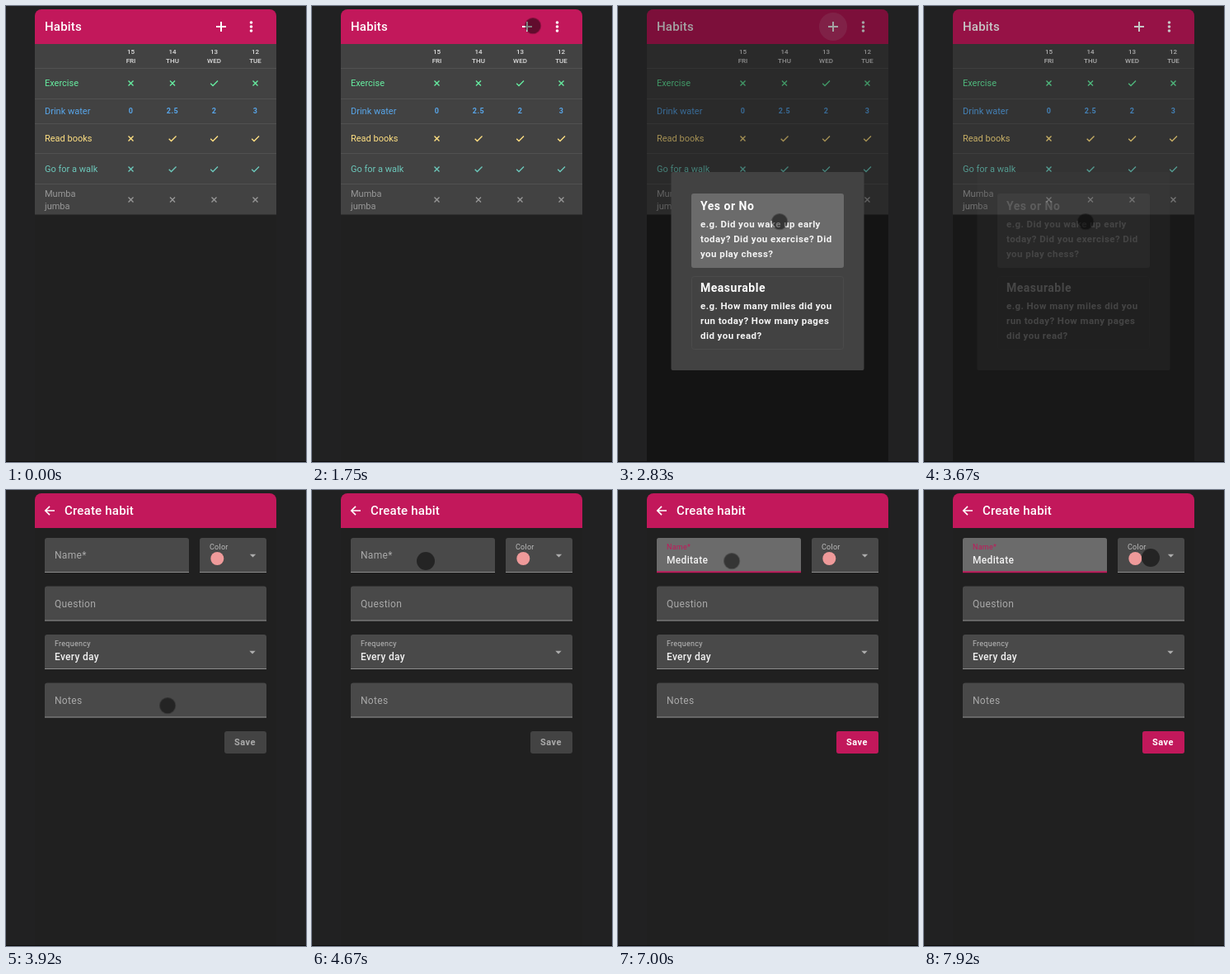
Write an HTML page that moves like this. It is 364 by 552 pixels and loops after 8 s.

```html
<!DOCTYPE html>
<html lang="en">
<head>
<meta charset="utf-8">
<title>Habits</title>
<style>
html, body { margin: 0; width: 364px; height: 552px; overflow: hidden; background: #212122; }
svg { display: block; font: 12px Roboto, sans-serif; letter-spacing: .3px; }

.bar { fill: #c2185b; }
.title { font-size: 15px; font-weight: 500; letter-spacing: .2px; fill: #fff; }
.day { font-size: 8px; font-weight: 500; letter-spacing: 0; text-anchor: middle; fill: #dedede; }
.habit { font-size: 11px; letter-spacing: 0; fill: currentColor; }
.count { font-size: 9px; font-weight: 700; letter-spacing: .5px; text-anchor: middle; fill: currentColor; }
.mark { fill: none; stroke: currentColor; stroke-width: 1.4; }
.rule { stroke: #515151; }
.kind { font-size: 14px; font-weight: 700; letter-spacing: .5px; fill: #fff; }
.hint { font-size: 11.5px; font-weight: 700; letter-spacing: .43px; fill: #f4f4f4; }
.field { fill: #494949; }
.line { stroke: #8c8c8c; }
.empty { fill: #a9a9a9; }
.label { font-size: 9px; letter-spacing: .25px; fill: #bdbdbd; }
.value { font-weight: 500; fill: #f2f2f2; }
.save { font-size: 11px; font-weight: 700; letter-spacing: .5px; }

/* One loop is 96 ticks of 83.33 ms */
.list, .form, .scrim, .dialog, .ripple, .caret, .blink, .touch, .press {
  animation: 8s linear -6ms infinite;
}
.list { animation-name: list; }
.form { animation-name: form; }
.scrim { animation-name: scrim; }
.dialog { animation-name: dialog; transform-origin: 181.5px 321px; }
.ripple { animation-name: ripple; }
.caret { animation-name: caret; animation-timing-function: step-end; }
.blink { animation-name: blink; animation-timing-function: step-end; }
.touch { animation-name: touch; }
.press { animation-name: press; animation-timing-function: step-end; }

/* Appears at tick --f and stays until its screen is gone */
.on { animation: on 8s step-end calc(var(--f) * 83.333ms - 8006ms) infinite; }

@keyframes on { 0% { visibility: visible } 50%, 100% { visibility: hidden } }
@keyframes list {
  0% { opacity: 1; animation-timing-function: step-end }
  46.875%, 100% { opacity: 0 }
}
@keyframes form {
  0% { opacity: 0; animation-timing-function: step-end }
  46.875%, 100% { opacity: 1 }
}
@keyframes scrim {
  0%, 24.5% { opacity: 0 }
  26.5% { opacity: 1 }
  44.7917% { opacity: .85; animation-timing-function: step-end }
  45.8333%, 100% { opacity: .62 }
  44.78% { opacity: 1 }
}
@keyframes dialog {
  0%, 24.5% { opacity: 0; transform: scale(.8) }
  25.6% { opacity: 1 }
  26.5%, 44.78% { opacity: 1; transform: none }
  44.7917% { opacity: .55; animation-timing-function: step-end }
  45.8333%, 100% { opacity: .2; transform: none }
}
@keyframes ripple {
  0%, 24% { opacity: 0 }
  26%, 44.78% { opacity: 1 }
  44.7917%, 100% { opacity: 0 }
}
@keyframes caret {
  0% { transform: translateX(59px) }
  67.7083% { transform: translateX(70px) }
  70.8333% { transform: translateX(76.8px) }
  73.9583% { transform: translateX(87px) }
  76.0417% { transform: translateX(91.3px) }
  77.0833% { transform: translateX(98px) }
  79.1667% { transform: translateX(102.4px) }
  80.2083%, 100% { transform: translateX(109px) }
}
@keyframes blink {
  0%, 59.375% { opacity: 1 }
  64.5833% { opacity: 0 }
  67.7083% { opacity: 1 }
  87.5% { opacity: 0 }
  92.7083% { opacity: 1 }
  98.9583%, 100% { opacity: 0 }
}
@keyframes touch {
  0% { transform: translate(60px, 564px) }
  5.2083% { transform: translate(60px, 564px); animation-timing-function: steps(10, start) }
  15.625% { transform: translate(220px, 190px); animation-timing-function: steps(5, start) }
  20.8333% { transform: translate(268px, 24px) }
  25% { transform: translate(268px, 24px); animation-timing-function: steps(10, start) }
  35.4167% { transform: translate(196px, 261px) }
  50% { transform: translate(196px, 261px); animation-timing-function: steps(9, start) }
  59.375% { transform: translate(138px, 86px) }
  91.6667% { transform: translate(138px, 86px); animation-timing-function: steps(4, start) }
  95.8333% { transform: translate(207px, 64px); animation-timing-function: steps(4, start) }
  100% { transform: translate(275px, 82px) }
}
@keyframes press {
  0%, 25%, 50%, 91.6667%, 100% { transform: none }
  21.875%, 35.4167%, 59.375% { transform: scale(.88) }
}
</style>
</head>
<body>
<svg width="364" height="552" viewBox="0 0 364 552">
  <defs>
    <path id="no" class="mark" d="M-3-3 3 3M3-3-3 3"/>
    <path id="yes" class="mark" d="M-4.3.3-1.5 3 4.5-3"/>
    <path id="top" d="M35 46V12a8 8 0 0 1 8-8H320a8 8 0 0 1 8 8V46z"/>
    <path id="drop" d="M-3.7-1.8H3.7L0 1.9z" fill="#adadad"/>
  </defs>
  <rect x="35" y="46" width="293" height="506" fill="#202020"/>

  <g class="list">
    <use href="#top" class="bar"/>
    <text class="title" x="47" y="30">Habits</text>
    <circle class="ripple" cx="261" cy="25" r="17" fill="#fff" fill-opacity=".13"/>
    <path d="M255 25h12M261 19v12" stroke="#fff" stroke-width="2"/>
    <g fill="#fff">
      <circle cx="297.5" cy="20" r="1.8"/><circle cx="297.5" cy="25" r="1.8"/><circle cx="297.5" cy="30" r="1.8"/>
    </g>
    <rect x="35" y="46" width="293" height="206.5" fill="#424242"/>
    <g id="table"></g>

    <path class="scrim" d="M35 552V12a8 8 0 0 1 8-8H320a8 8 0 0 1 8 8V552z" fill-opacity=".36"/>
    <g class="dialog">
      <rect x="64.5" y="201" width="234" height="240" rx="2" fill="#424242"/>
      <rect x="89.5" y="327.5" width="184" height="88" rx="3" fill="none" stroke="#4b4b4b"/>
      <rect x="89" y="227" width="185" height="90" rx="3" fill="#484848"/>
      <rect class="on" style="--f:32" x="89" y="227" width="185" height="90" rx="3" fill="#6b6b6b"/>
      <text class="kind" x="100" y="247">Yes or No</text>
      <text class="hint">
        <tspan x="100" y="268">e.g. Did you wake up early</tspan>
        <tspan x="100" y="286">today? Did you exercise? Did</tspan>
        <tspan x="100" y="304">you play chess?</tspan>
      </text>
      <text class="kind" x="100" y="346">Measurable</text>
      <text class="hint">
        <tspan x="100" y="367">e.g. How many miles did you</tspan>
        <tspan x="100" y="385">run today? How many pages</tspan>
        <tspan x="100" y="403">did you read?</tspan>
      </text>
    </g>
  </g>

  <g class="form">
    <use href="#top" class="bar"/>
    <path d="M59 25H48.5M53 19.8 47.8 25 53 30.2" fill="none" stroke="#fff" stroke-width="1.7"/>
    <text class="title" x="71" y="30">Create habit</text>
    <g id="fields"></g>

    <text class="empty" x="59" y="83">Name*</text>
    <text class="label" x="247" y="72">Color</text>
    <circle cx="256.3" cy="83" r="8" fill="#ef9a9a"/>
    <use href="#drop" x="299.5" y="79.5"/>
    <text class="empty" x="59" y="142">Question</text>
    <text class="label" x="59" y="189">Frequency</text>
    <text class="value" x="59" y="206">Every day</text>
    <use href="#drop" x="299" y="196.5"/>
    <text class="empty" x="59" y="259">Notes</text>

    <rect x="265" y="292" width="51" height="27" rx="3" fill="#434343"/>
    <text class="save" x="277" y="309" fill="#ababab">Save</text>
    <g class="on" style="--f:65">
      <rect class="bar" x="265" y="292" width="51" height="27" rx="3"/>
      <text class="save" x="277" y="309" fill="#fff">Save</text>
    </g>

    <g class="on" style="--f:57">
      <path d="M47 100V61a3 3 0 0 1 3-3H219a3 3 0 0 1 3 3V100z" fill="#6b6b6b"/>
      <rect class="bar" x="47" y="98.3" width="175" height="1.9"/>
      <text class="label" x="59" y="72" style="fill:#c2185b">Name*</text>
      <g class="caret"><rect class="bar blink" y="78" width="1" height="14"/></g>
    </g>
    <text class="value" id="typed" x="59" y="89"></text>
  </g>

  <g class="touch"><circle class="press" r="11" fill-opacity=".5"/></g>
  <rect y="551" width="364" height="1" fill="#0b0b0b"/>
</svg>
<script>
const put = (id, html) => document.getElementById(id).innerHTML = html;
const cols = [151.5, 202, 252.5, 302.5];

const days = ['15 FRI', '14 THU', '13 WED', '12 TUE'].map((d, i) => {
  const [num, name] = d.split(' ');
  return `<text class="day" x="${cols[i]}" y="58">${num}</text><text class="day" x="${cols[i]}" y="69">${name}</text>`;
});

// name, middle of the row, colour, one entry per day
const rows = [
  ['Exercise', 93.5, '#66eca0', 'no no yes no'],
  ['Drink water', 127, '#58a6ea', '0 2.5 2 3'],
  ['Read books', 160.5, '#ffe082', 'no yes yes yes'],
  ['Go for a walk', 197.5, '#6cc8bb', 'no yes yes yes'],
  ['Mumba|jumba', 234.5, '#979797', 'no no no no']
].map(([name, y, color, marks]) => {
  const lines = name.split('|');
  const label = lines.map((s, i) =>
    `<text class="habit" x="47" y="${y + 3.8 + (i - (lines.length - 1) / 2) * 15}">${s}</text>`);
  const cells = marks.split(' ').map((m, i) => isNaN(m)
    ? `<use href="#${m}" x="${cols[i]}" y="${y}"/>`
    : `<text class="count" x="${cols[i]}" y="${y + 3.2}">${m}</text>`);
  return `<g color="${color}">${label.join('')}${cells.join('')}</g>`;
});

const rules = [75.5, 112.5, 142.5, 178.5, 215.5].map(y => `<path class="rule" d="M35 ${y}H328"/>`);
put('table', [...rules, ...days, ...rows].join(''));

put('fields', [[47, 58, 175], [235, 58, 81], [47, 116.5, 269], [47, 175, 269], [47, 233.5, 269]].map(([x, y, w]) =>
  `<path class="field" d="M${x} ${y + 42}v-39a3 3 0 0 1 3-3h${w - 6}a3 3 0 0 1 3 3v39z"/>
   <path class="line" d="M${x} ${y + 41.5}h${w}"/>`).join(''));

const keys = [65, 68, 71, 71, 73, 74, 76, 77];
put('typed', [...'Meditate'].map((c, i) => `<tspan class="on" style="--f:${keys[i]}">${c}</tspan>`).join(''));
</script>
</body>
</html>
```
